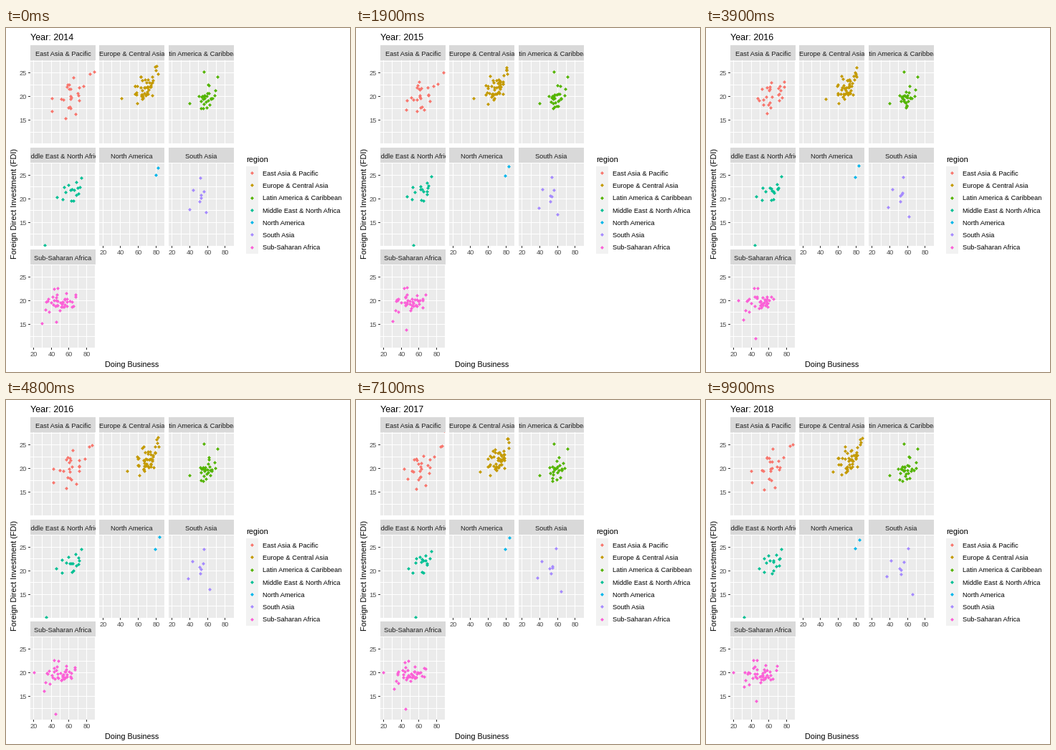
A matplotlib script that plays this animation: 480x480 px, repeating every 10000 ms.

```python
from collections import namedtuple

import numpy as np
import matplotlib.pyplot as plt
from matplotlib.animation import FuncAnimation
from matplotlib.patches import Rectangle

SIZE, DPI = 480, 72
FRAMES, INTERVAL = 100, 100
FIRST_YEAR, SPANS = 2014, 4

# n points around (x, y) with spreads (sx, sy) and correlation rho;
# share of rows that trade places each year; drift of x over the loop;
# paths of single points, with keys spread evenly over the loop
Region = namedtuple("Region", "color n x y sx sy rho share drift paths",
                    defaults=[0, 0, 0, 0, 0, 0, 0, 0, ()])

REGIONS = {
    "East Asia & Pacific": Region(
        "#F8766D", 26, 65, 20.5, 12.5, 2.9, 0.55, 0.5),
    "Europe & Central Asia": Region(
        "#C49A00", 46, 69.5, 22.2, 6.8, 1.7, 0.5, 0.4, 5,
        [[(41.5, 19.6), (54.4, 19.2)]]),
    "Latin America & Caribbean": Region(
        "#53B400", 26, 60, 20.5, 5.5, 1.7, 0.5, 0.4, 0,
        [[(56, 25.2)], [(40, 18.5)], [(72, 24.1)]]),
    "Middle East & North Africa": Region(
        "#00C094", 16, 61, 21.3, 7.5, 1.3, 0.4, 0.35, 0,
        [[(x, 10.1) for x in (33, 60, 33, 60, 32)]]),
    "North America": Region(
        "#00B6EB", paths=[[(80, 25), (79.5, 24.4), (79.5, 24.7)],
                          [(83, 26.5), (84, 27.1), (84, 26.5)]]),
    "South Asia": Region(
        "#A58AFF", 4, 57, 20.8, 3, 0.8, 0, 0.5, 0,
        [[(40, 17.7), (37, 18.8)], [(44, 21.8), (42, 22)],
         [(52, 24.4), (61, 24.7)], [(59, 17), (66, 14.9)]]),
    "Sub-Saharan Africa": Region(
        "#FB61D7", 38, 51, 20, 9, 1.4, 0.1, 0.4, 0,
        [[(30, 15.2), (32, 16.1), (32, 17)], [(46, 20), (20, 20), (20, 20)],
         [(46, 15.5), (45, 11), (46, 13.9)]]),
}

plt.rcParams["font.family"] = "Liberation Sans"
fig = plt.figure(figsize=(SIZE / DPI, SIZE / DPI), dpi=DPI, facecolor="white")
ax = fig.add_axes([0, 0, 1, 1])
ax.set(xlim=(0, SIZE), ylim=(SIZE, 0))
ax.axis("off")


# ---- data ----

def yearly_clouds(r, seed):
    """One cloud per year; some rows swap, so points cross between years."""
    rng = np.random.default_rng(seed)
    a, b = np.clip(rng.normal(size=(2, r.n)), -1.9, 1.9)
    b = r.rho * a + np.sqrt(1 - r.rho ** 2) * b
    base = np.column_stack([r.x + r.sx * a, r.y + r.sy * b])
    years = [base]
    for k in range(1, SPANS + 1):
        pos = base.copy()
        rows = rng.permutation(r.n)[:int(r.share * r.n)]
        pos[np.sort(rows)] = base[rows]
        pos += rng.normal(0, (0.8, 0.2), pos.shape)
        pos[:, 0] += r.drift * k / SPANS
        years.append(pos)
    return years


def along(path, t):
    keys = np.linspace(0, SPANS, len(path))
    return [np.interp(t, keys, axis) for axis in zip(*path)]


# ---- static layout ----

def box(x, y, w, h, color):
    patch = Rectangle((x, y), w, h, fc=color, lw=0, antialiased=False)
    return ax.add_patch(patch)


def label(x, y, text, size=9.2, color="black", ha="left", **kw):
    kw.setdefault("va", "baseline")
    return ax.text(x, y, text, size=size, color=color, ha=ha, **kw)


def dots(color):
    return ax.scatter([], [], s=12, c=color, marker="D", lw=0,
                      antialiased=False, zorder=2)


class Panel:
    def __init__(self, i, name, region):
        row, col = divmod(i, 3)
        self.left, self.top = 34 + 96.6 * col, 45.2 + 142.4 * row
        x, y = int(self.left), round(self.top)
        self.bottom = y + 116
        strip = box(x, y - 21, 91, 21, "#D9D9D9")
        label(x + 45.5, y - 6, name, color="#1A1A1A", ha="center",
              clip_on=True).set_clip_path(strip)
        area = box(x, y, 91, 116, "#EBEBEB")
        for v in np.arange(20, 91, 10):
            box(round(self.px(v)), y, 1, 116, "white")
        for v in np.arange(12.5, 28, 2.5):
            box(x, round(self.py(v)), 91, 1, "white")
        if col == 0:
            self.y_axis(x)
        if i in (4, 5, 6):
            self.x_axis()
        self.region = region
        self.years = yearly_clouds(region, seed=i + 3)
        self.dots = dots(region.color)
        self.dots.set_clip_path(area)

    def px(self, v):
        return self.left + 4 + (v - 20) * 1.235

    def py(self, v):
        return self.top + 17 + (25 - v) * 6.6

    def y_axis(self, x):
        for v in (15, 20, 25):
            y = round(self.py(v))
            box(x - 3, y, 3, 1, "#333333")
            label(x - 5, y + 4, v, color="#4D4D4D", ha="right")

    def x_axis(self):
        for v in (20, 40, 60, 80):
            x = round(self.px(v))
            box(x, self.bottom, 1, 3, "#333333")
            label(x + 0.5, self.bottom + 12, v, color="#4D4D4D", ha="center")

    def move(self, t):
        k = min(int(t), SPANS - 1)
        u = t - k
        pts = self.years[k] * (1 - u) + self.years[k + 1] * u
        for path in self.region.paths:
            pts = np.vstack([pts, along(path, t)])
        xy = np.column_stack([self.px(pts[:, 0]), self.py(pts[:, 1])])
        self.dots.set_offsets(np.round(xy))


panels = [Panel(i, *item) for i, item in enumerate(REGIONS.items())]

title = label(34, 17, "", size=12.5)
label(175.5, 473, "Doing Business", size=10.8, ha="center")
label(12, 244.5, "Foreign Direct Investment (FDI)", size=11, ha="center",
      va="center", rotation=90)

label(335, 187, "region", size=11)
for i, (name, region) in enumerate(REGIONS.items()):
    y = 202 + 17.28 * i
    box(335, round(y - 8.64), 17, 18, "#F2F2F2")
    dots(region.color).set_offsets([(343, round(y))])
    label(358, y + 3.8, name)


# ---- motion ----

def update(frame):
    t = frame * SPANS / (FRAMES - 1)
    title.set_text(f"Year: {int(FIRST_YEAR + t + 0.5)}")
    for panel in panels:
        panel.move(t)
    return [title] + [p.dots for p in panels]


anim = FuncAnimation(fig, update, frames=FRAMES, interval=INTERVAL,
                     repeat=True, repeat_delay=0)
plt.show()
```
